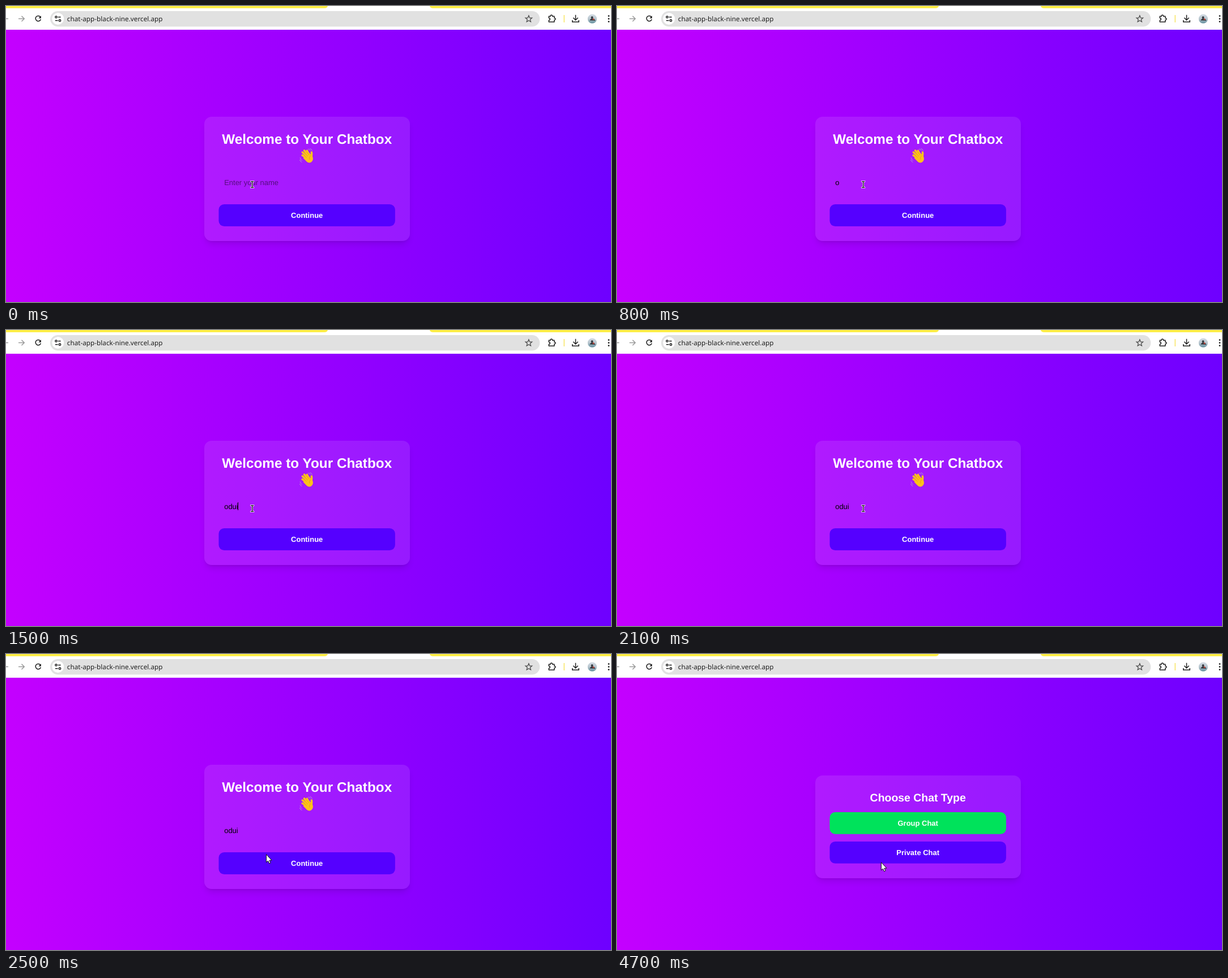
An HTML page that plays this animation: 1068 by 524 pixels, repeating every 8 s.

```html
<!DOCTYPE html>
<html lang="en">
<head>
<meta charset="utf-8">
<title>Chatbox welcome</title>
<style>
  html, body { margin: 0; width: 100%; height: 100%; overflow: hidden; background: #fff; }
  #page { position: absolute; left: 0; top: 42px; width: 1068px; height: 482px;
    background: linear-gradient(90deg, #c400ff, #6e00ff); }
  #card { position: absolute; left: 349.6px; width: 363.3px; border-radius: 13px;
    background: rgba(255, 255, 255, .1);
    box-shadow: 0 8.1px 12.2px -2.4px rgba(0, 0, 0, .1), 0 3.2px 4.9px -3.2px rgba(0, 0, 0, .1); }
  svg { position: absolute; left: 0; top: 0; display: block; }
  text { font-family: "Liberation Sans", Arial, sans-serif; font-size: 12.98px; text-rendering: geometricPrecision; }
  .title, .label { font-weight: bold; fill: #fff; text-anchor: middle; }
  .url { font-family: "Noto Sans", "Open Sans", sans-serif; font-size: 11.74px; fill: #1f1f1f; }
  .line { fill: none; stroke: #1f1f1f; stroke-width: 1.5; }
  .faded { stroke: #9b9b9b; }
</style>
</head>
<body>
<div id="page"></div>
<div id="card"></div>
<svg width="1068" height="524" viewBox="0 0 1068 524">
  <defs>
    <linearGradient id="photo" x1="0" y1="0" x2="0" y2="1">
      <stop offset="0" stop-color="#d3dce3"/>
      <stop offset=".5" stop-color="#b9c6cf"/>
      <stop offset="1" stop-color="#5f8d9c"/>
    </linearGradient>
  </defs>

  <g id="toolbar">
    <rect width="1068" height="42" fill="#fff"/>
    <path d="M0 0H568Q567 4 562 4H0ZM1068 0H748Q749 4 754 4H1068Z" fill="#fdee45"/>
    <path class="line faded" d="M-6 22.5H4M22 22.5H32M27.5 17.7L32.3 22.5L27.5 27.3"/>
    <path class="line" d="M60.6 19.2A4.7 4.7 0 1 0 61.4 23.6"/>
    <path d="M61.9 17.2V21.7H57.4Z" fill="#1f1f1f"/>
    <rect x="78" y="9" width="864.3" height="27.6" rx="13.8" fill="#e1e1e1"/>
    <circle cx="91.7" cy="22.7" r="10.4" fill="#fff"/>
    <g class="line" stroke-width="1.3">
      <circle cx="88.5" cy="19.6" r="1.7"/><path d="M91.8 19.6H96.7"/>
      <circle cx="95" cy="25.7" r="1.7"/><path d="M86.8 25.7H91.7"/>
    </g>
    <text class="url" x="107.8" y="26.7">chat-app-black-nine.vercel.app</text>
    <path id="star" class="line" style="stroke:#474747;stroke-width:1.2"/>
    <path class="line" stroke-linejoin="round" d="M958.3 18.2H961.2V17.6A1.6 1.6 0 0 1 964.5 17.6V18.2H967.9V21.4H968.4A1.6 1.6 0 0 1 968.4 24.7H967.9V28.2H958.3V25.2A2 2 0 0 0 958.3 21.2Z"/>
    <rect x="984.6" y="16" width="1.4" height="13" fill="#f8e45a"/>
    <path class="line" d="M1005.5 15.8V24.6M1001.3 20.8L1005.5 25L1009.7 20.8M999.8 25V28.3H1011.2V25"/>
    <circle cx="1034.9" cy="22.7" r="8.1" fill="url(#photo)"/>
    <path d="M1030.3 25.5Q1033 21 1035.5 22Q1039.5 23 1040.3 26Z" fill="#34383e"/>
    <circle cx="1034.6" cy="20.2" r="1.9" fill="#34383e"/>
    <circle cx="1037" cy="23.5" r="1.4" fill="#c4473d"/>
    <g fill="#1f1f1f">
      <circle cx="1064" cy="17.7" r="1.4"/><circle cx="1064" cy="22.7" r="1.4"/><circle cx="1064" cy="27.7" r="1.4"/>
    </g>
  </g>

  <g id="welcome">
    <text class="title" x="531.2" y="244.4" style="font-size:24.33px">Welcome to Your Chatbox</text>
    <g id="wave" fill="none" stroke-linecap="round" stroke-linejoin="round">
      <path stroke="#fcc21b" stroke-width="3.5" d="M532 270L523.2 264.3M532.5 267L523.4 259M534 265L526.6 255.8M536 265L531.4 256.2M538.5 268.5Q540.2 264 539.4 259"/>
      <path fill="#fcc21b" d="M526.5 265.5L535 259.5L541 266Q543.5 272 539.3 276Q535 279.2 530.8 275.6L524.8 269.2Z"/>
      <path stroke="#e59600" stroke-width=".7" d="M526 264.4L530.6 268M526.5 259.7L532.6 265.8M530.3 257.8L535.2 263.9M537.6 264.8Q534.5 267.6 535.8 271.3"/>
      <path stroke="#b39ad0" stroke-width=".9" d="M533.5 253.2Q536.1 253.5 537.4 255.8M536.8 252.4Q539.6 253.3 540.5 256M519.2 268.7Q519.8 272 522.4 273.6M518.6 272.5Q519.4 275.3 522 276.6"/>
    </g>
    <text id="field" x="385.2" y="316.5"></text>
    <rect id="caret" y="305" width="1" height="14"/>
    <rect id="continue" x="375.5" y="351" width="311.4" height="39" rx="9.7"/>
    <text class="label" x="531.2" y="375">Continue</text>
  </g>

  <g id="choice">
    <text class="title" x="531.2" y="260.7" style="font-size:19.46px">Choose Chat Type</text>
    <rect x="375.5" y="280" width="311.4" height="38.8" rx="9.7" fill="#00e25b"/>
    <text class="label" x="531.2" y="303.8">Group Chat</text>
    <rect x="375.5" y="332" width="311.4" height="38.8" rx="9.7" fill="#5500ff"/>
    <text class="label" x="531.2" y="355.7">Private Chat</text>
  </g>

  <g id="beam" fill="none" stroke-linecap="square">
    <path stroke="#fff" stroke-width="2.6" d="M432.5 310.5H433.6L434.7 311.4L435.8 310.5H436.9M434.7 311.4V320.6M432.5 321.5H433.6L434.7 320.6L435.8 321.5H436.9"/>
    <path stroke="#000" stroke-width="1.2" d="M432.5 310.5H433.6L434.7 311.4L435.8 310.5H436.9M434.7 311.4V320.6M432.5 321.5H433.6L434.7 320.6L435.8 321.5H436.9"/>
  </g>
  <path id="arrow" d="M0 0V14L3.1 11.3L5.1 16L7.5 15L5.5 10.4H9.6Z" fill="#fff" stroke="#111" stroke-width="1" stroke-linejoin="round"/>
</svg>
<script>
  const LOOP = 8000, CHOICE_AT = 4700, HOVER_AT = 2600;
  const NAME = "odui";
  const $ = id => document.getElementById(id);
  const show = (el, on) => { el.style.display = on ? "" : "none"; };

  // [start, letters typed, caret visible]
  const typing = [[0, 0, false], [100, 1, true], [800, 1, false], [1000, 2, true],
    [1100, 3, true], [1500, 4, true], [2100, 4, false]];
  // [start, x, y] of the arrow tip
  const pointer = [[2400, 450, 338], [2500, 459.5, 354.8], [HOVER_AT, 466.4, 368.8]];
  const stepAt = (steps, t) => steps.filter(([start]) => start <= t).pop();

  const starPoints = Array.from({ length: 10 }, (_, i) => {
    const angle = i * Math.PI / 5, r = i % 2 ? 2.7 : 6.2;
    return `${922.8 + r * Math.sin(angle)} ${23 - r * Math.cos(angle)}`;
  });
  $("star").setAttribute("d", `M${starPoints.join("L")}Z`);

  function render(t) {
    const choosing = t >= CHOICE_AT;
    show($("welcome"), !choosing);
    show($("choice"), choosing);
    $("card").style.top = choosing ? "214.9px" : "195.5px";
    $("card").style.height = choosing ? "181.7px" : "220.6px";

    if (!choosing) {
      const [, count, caretOn] = stepAt(typing, t);
      const field = $("field");
      field.textContent = count ? NAME.slice(0, count) : "Enter your name";
      field.setAttribute("fill-opacity", count ? 1 : .5);
      show($("caret"), caretOn);
      $("caret").setAttribute("x", Math.floor(385.2 + field.getComputedTextLength()));
      $("continue").setAttribute("fill", t >= HOVER_AT ? "#4d00e8" : "#5500ff");
    }

    const tip = stepAt(pointer, t);
    show($("beam"), !tip);
    show($("arrow"), tip);
    if (tip) $("arrow").setAttribute("transform", `translate(${tip[1]} ${tip[2]})`);
  }

  const began = performance.now();
  function tick() {
    render((performance.now() - began) % LOOP);
    requestAnimationFrame(tick);
  }
  tick();
</script>
</body>
</html>
```
